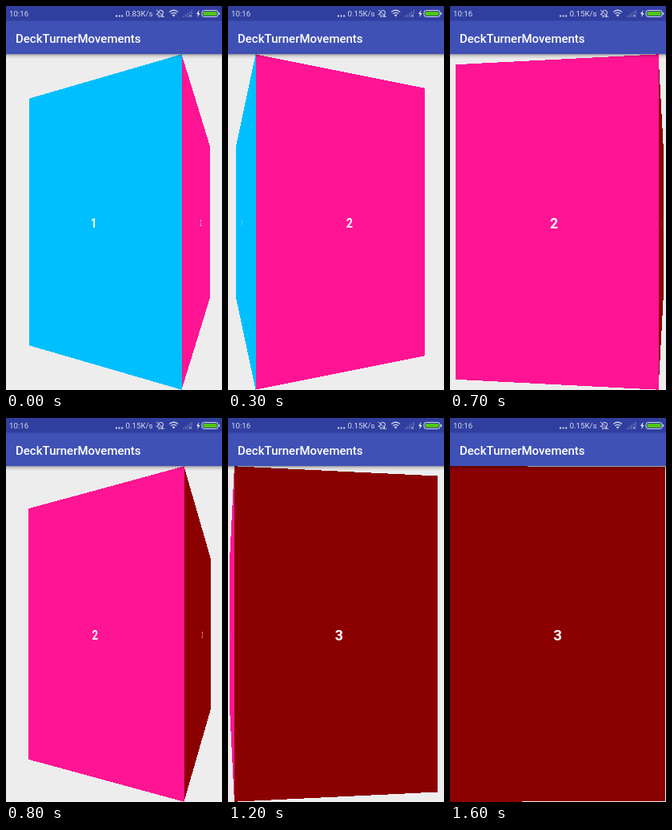
An HTML page that plays this animation: 270 by 480 pixels, repeating every 1.7 s.

```html
<!DOCTYPE html>
<html lang="en">
<head>
<meta charset="utf-8">
<title>Cube pager</title>
<style>
  html, body { margin: 0; width: 100%; height: 100%; overflow: hidden; background: #eeedee; }
  svg { display: block; font-family: Roboto, sans-serif; }
  .page polygon { shape-rendering: crispEdges; }
  .page text { font-size: 18.75px; font-weight: 700; fill: #fff; text-anchor: middle; }
</style>
</head>
<body>
<svg width="270" height="480" viewBox="0 0 270 480">
  <defs>
    <linearGradient id="shade" x2="0" y2="1">
      <stop offset="0" stop-opacity=".36"/>
      <stop offset=".4" stop-opacity=".13"/>
      <stop offset="1" stop-opacity="0"/>
    </linearGradient>
  </defs>
  <rect width="270" height="480" fill="#eeedee"/>
  <g class="page" fill="#00bfff"><polygon/><text y="7.3">1</text></g>
  <g class="page" fill="#ff1493"><polygon/><text y="7.3">2</text></g>
  <g class="page" fill="#8b0000"><polygon/><text y="7.3">3</text></g>

  <rect y="60" width="270" height="6" fill="url(#shade)"/>
  <rect width="270" height="60" fill="#3f51b5"/>
  <rect width="270" height="18.5" fill="#303f9f"/>
  <text x="12" y="46" font-size="15" font-weight="500" fill="#fff">DeckTurnerMovements</text>
  <g fill="#d6d9ec" font-size="9.7">
    <text x="4" y="13.4">10:16</text>
    <text id="speed" x="149.5" y="13.4"></text>
    <path d="M137 11.4h2v2h-2zM140.6 11.4h2v2h-2zM144.2 11.4h2v2h-2z"/>
  </g>
  <g fill="none" stroke="#d6d9ec">
    <path d="M189 12.3h8l-1.2-1.7V8.2a2.8 2.8 0 0 0-5.6 0v2.4zM192 14h2" transform="rotate(25 193 9.5)"/>
    <path d="M188 5l10 9"/>
    <path d="M204.2 7.6a7.4 7.4 0 0 1 10.8 0M206.2 9.8a4.7 4.7 0 0 1 6.8 0" stroke-width="1.3"/>
    <path d="M229 10.8l3 3m0-3l-3 3" stroke-width=".9"/>
    <rect x="245" y="5.5" width="20" height="8" rx="2.6"/>
  </g>
  <path d="M207.8 11.5a2.5 2.5 0 0 1 3.6 0l-1.8 2z" fill="#d6d9ec"/>
  <path d="M221 12h1.6v2H221zM223.6 10.3h1.6V14h-1.6zM226.2 8.6h1.6V14h-1.6zM228.8 6.8h1.6v3h-1.6zM231.4 5h1.6v5h-1.6z" fill="#5a67b1"/>
  <path d="M241.5 5l-3.5 5h2l-.8 4 3.5-5h-2z" fill="#e4e6f3"/>
  <rect x="246.5" y="7" width="17" height="5" rx="1" fill="#4fc414"/>
  <path d="M265.9 8h1.2v3h-1.2z" fill="#d6d9ec"/>
</svg>
<script>
  const WIDTH = 270, HALF = 209.7, MIDDLE = 270, DEPTH = 216, INSET = -0.5;
  const LOOP = 1700, STEP = 100, REST = 0.375;
  const pages = [...document.querySelectorAll('.page')];
  const speed = document.getElementById('speed');

  const settle = (from, t, span) =>
    Math.max(REST, from * Math.max(0, 1 - t / span) ** 5);

  // x of the cube's front edge: finger drag, then quintic deceleration
  function edgeAt(t) {
    if (t < 200) return 220 - 0.675 * t;
    if (t < 700) return settle(85, t - 200, 615);
    if (t < 1000) return Math.min(261, 223 - 0.5225 * (t - 800));
    return settle(118.5, t - 1000, 488);
  }

  // Page turned about the edge; pos is its offset from rest in page widths
  function drawPage(page, pos, edge) {
    const [face, label] = page.children;
    const shown = Math.abs(pos) < 1;
    page.setAttribute('visibility', shown ? 'visible' : 'hidden');
    if (!shown) return;

    const angle = Math.abs(pos) * Math.PI / 2, side = pos < 0 ? -1 : 1;
    const cos = Math.cos(angle), sin = Math.sin(angle);
    const scaleAt = u => DEPTH / (DEPTH + u * sin);
    const xAt = u => edge + INSET + side * u * cos * scaleAt(u);

    const far = xAt(WIDTH), near = xAt(0), h = HALF * scaleAt(WIDTH);
    face.setAttribute('points',
      `${near},${MIDDLE - HALF} ${far},${MIDDLE - h} ${far},${MIDDLE + h} ${near},${MIDDLE + HALF}`);

    const s = scaleAt(WIDTH / 2);
    label.setAttribute('transform',
      `translate(${xAt(WIDTH / 2)} ${MIDDLE + 0.5}) scale(${cos * s * s} ${s})`);
  }

  function render(t) {
    const edge = edgeAt(t);
    const scroll = (t < 700 ? 1 : 2) - edge / WIDTH;
    pages.forEach((page, i) => drawPage(page, i - scroll, edge));
    speed.textContent = t < STEP ? '0.83K/s' : '0.15K/s';
  }

  const start = performance.now();
  function tick() {
    const t = (performance.now() - start) % LOOP;
    render(Math.floor(t / STEP) * STEP);
    requestAnimationFrame(tick);
  }
  tick();
</script>
</body>
</html>
```
